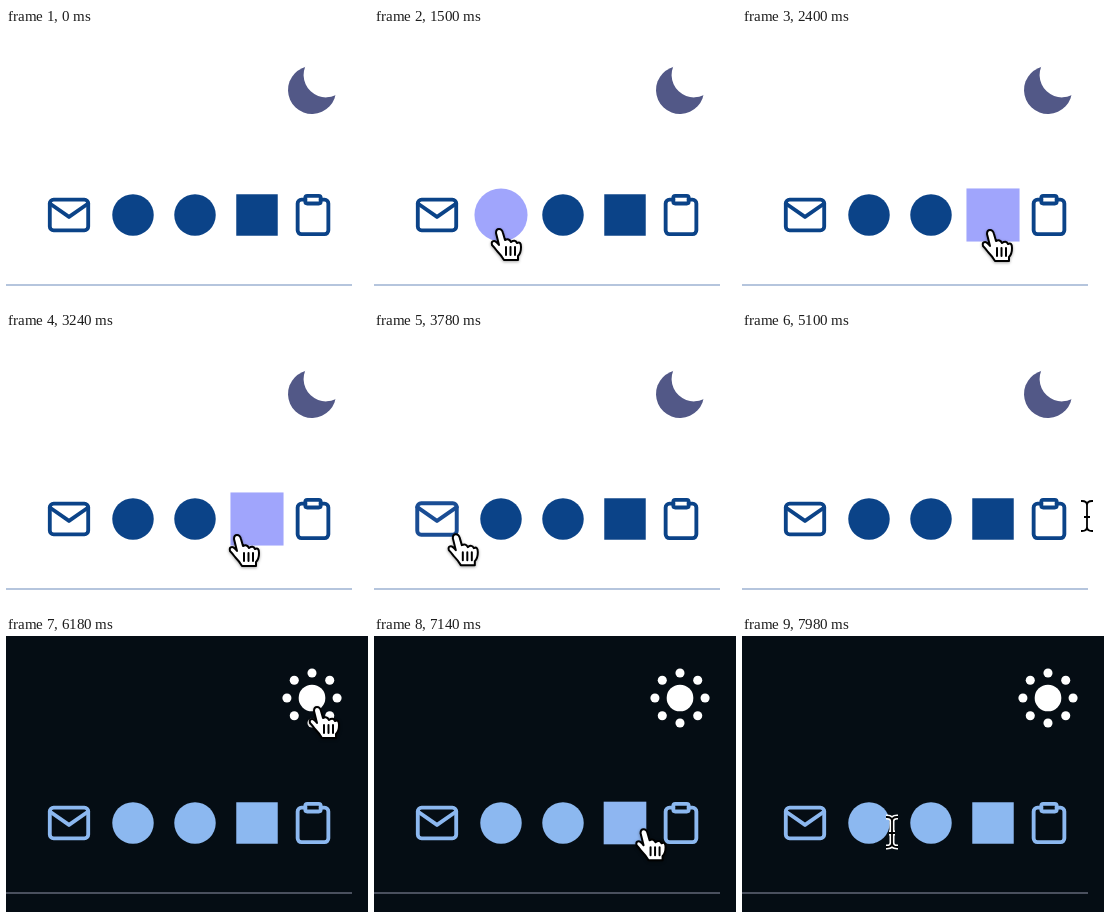
An HTML page for the animation above (8000 ms loop, 362 px wide and 276 px high).

```html
<!DOCTYPE html>
<html lang="en">
<head>
<meta charset="utf-8">
<title>Theme toggle and icon row</title>
<style>
  html, body { margin: 0; width: 100%; height: 100%; overflow: hidden; }
  svg { display: block; width: 362px; height: 276px; }
  .line { fill: none; stroke: currentColor; stroke-width: 2; stroke-linecap: round; stroke-linejoin: round; }
  .solid { fill: currentColor; }
  #hand { fill: #fff; stroke: #000; stroke-width: 2; stroke-linejoin: round; stroke-linecap: round; }
  #hand, #arrow { filter: drop-shadow(0 1.5px 1.5px rgba(0, 0, 0, .35)); }
</style>
</head>
<body>
<svg viewBox="0 0 362 276">
  <defs>
    <mask id="bite" maskUnits="userSpaceOnUse" x="-12" y="-12" width="24" height="24">
      <rect x="-12" y="-12" width="24" height="24" fill="#fff"/>
      <circle id="hole" r="8.4" fill="#000"/>
    </mask>
  </defs>
  <rect id="page" width="362" height="276"/>
  <rect id="rule" y="256" width="346" height="2"/>

  <g id="toggle">
    <circle id="disc" mask="url(#bite)"/>
    <g id="rays"></g>
  </g>

  <g class="icon line"><rect x="-10" y="-8" width="20" height="16" rx="2"/><path d="M10-6 0 1-10-6"/></g>
  <g class="icon solid"><circle r="10.8"/></g>
  <g class="icon solid"><circle r="10.8"/></g>
  <g class="icon solid"><rect x="-10.8" y="-10.8" width="21.6" height="21.6"/></g>
  <g class="icon line"><path d="M4-8h2a2 2 0 0 1 2 2V8a2 2 0 0 1-2 2H-6a2 2 0 0 1-2-2V-6a2 2 0 0 1 2-2h2"/><rect x="-4" y="-10" width="8" height="4" rx="1"/></g>

  <g id="cursor">
    <g id="hand" transform="translate(-1 -2)">
      <path d="M-4 4Q-4 0-1 0Q2 0 3 4L5 11Q9 9 11 13Q15 10 17 14Q21 12 21 18Q21 24 18 27V31H4Q1 26-3 22Q-6 18-8 16Q-9 12-6 12Q-4 12-1 16Z"/>
      <path d="M6 18V26M10.5 18V26M15 18V26"/>
    </g>
    <g id="beam" fill="none">
      <path id="stem" d="M-6-15h1q5 0 5 4V11q0 4-5 4h-1M6-15H5q-5 0-5 4M0 11q0 4 5 4h1M-3 1H3"/>
    </g>
    <path id="arrow" fill="#000" stroke="#fff" stroke-width="1.6" d="M0 0V24L5.5 19L9 27.5L13 26L9.5 17.5H17Z"/>
  </g>
</svg>
<script>
const LOOP = 8000, STEP = 60, TOGGLE = 5820, MORPH = 350, FADE = 100;
const $ = id => document.getElementById(id);
const icons = [...document.querySelectorAll('.icon')];
const centres = [63, 127, 189, 251, 307];

// Pointer stops: time, x, y
const stops = [
  [720, 64, 300], [1140, 66, 204], [1500, 127, 203], [2400, 250, 204], [2800, 303, 204],
  [3240, 233, 205], [4080, 62, 204], [4380, 183, 203], [4920, 318, 200], [5100, 345, 184],
  [5700, 313, 73], [6240, 313, 73], [6600, 337, 163], [7440, 262, 200], [7980, 150, 196]
];

const light = { page: '#fff', rule: '#b5c5dd', orb: [82, 88, 135], icon: [11, 67, 136], hover: [160, 165, 252] };
const dark = { page: '#050d14', rule: '#4a505e', orb: [255, 255, 255], icon: [140, 184, 240], hover: [160, 165, 252] };

const mix = (a, b, k) => a + (b - a) * k;
const blend = (a, b, k) => `rgb(${a.map((v, i) => Math.round(mix(v, b[i], k)))})`;
const easeOut = (u, power) => 1 - (1 - Math.min(1, Math.max(0, u))) ** power;
const set = (id, attrs) => Object.entries(attrs).forEach(([k, v]) => $(id).setAttribute(k, v));
const show = (id, on) => set(id, { visibility: on ? 'visible' : 'hidden' });

function pointer(t) {
  const i = stops.findIndex(s => s[0] >= t);
  if (i < 1) return stops[0].slice(1);
  const [a, b] = [stops[i - 1], stops[i]], k = easeOut((t - a[0]) / (b[0] - a[0]), 2);
  return [mix(a[1], b[1], k), mix(a[2], b[2], k)];
}

function hit(t) {
  const [x, y] = pointer(t);
  return Math.abs(y - 187) < 25 ? centres.findIndex(c => Math.abs(x - c) < 21) : -1;
}

// Share of the last moments spent over an icon
function hover(t, i) {
  let n = 0;
  for (let k = 0; k < 10; k++) n += hit(t - k * FADE / 10) === i;
  return n / 10;
}

for (let i = 0; i < 8; i++) {
  const a = i * Math.PI / 4;
  $('rays').innerHTML += `<circle cx="${9.4 * Math.cos(a)}" cy="${9.4 * Math.sin(a)}" r="1.7"/>`;
}

// White halo under a black core
const core = $('stem').cloneNode();
core.id = 'core';
$('beam').append(core);
set('stem', { stroke: '#fff', 'stroke-width': 5 });
set('core', { stroke: '#000', 'stroke-width': 1.8 });

function draw(t) {
  const theme = t < TOGGLE ? light : dark, k = easeOut((t - TOGGLE) / MORPH, 3);
  set('page', { fill: theme.page });
  set('rule', { fill: theme.rule });

  set('toggle', {
    transform: `translate(306 62) scale(2.667) rotate(${mix(43, 90, k)})`,
    fill: blend(light.orb, dark.orb, k)
  });
  set('disc', { r: mix(9, 5, k) });
  set('hole', { cx: mix(0, 18, k), cy: mix(-7.7, -12, k) });
  set('rays', { opacity: k });

  icons.forEach((el, i) => {
    const h = hover(t, i);
    el.setAttribute('transform', `translate(${centres[i]} 187) scale(${1.92 * mix(1, 1.28, h)})`);
    el.style.color = blend(theme.icon, theme.hover, h);
  });

  const [x, y] = pointer(t);
  const hand = Math.hypot(x - 306, y - 62) < 32 || hit(t) >= 0;
  const beam = !hand && y > 160 && y < 215;
  set('cursor', { transform: `translate(${x} ${y})` });
  show('hand', hand);
  show('beam', beam);
  show('arrow', !hand && !beam);
}

function frame(now) {
  draw(Math.floor(now % LOOP / STEP) * STEP);
  requestAnimationFrame(frame);
}
draw(0);
requestAnimationFrame(frame);
</script>
</body>
</html>
```
